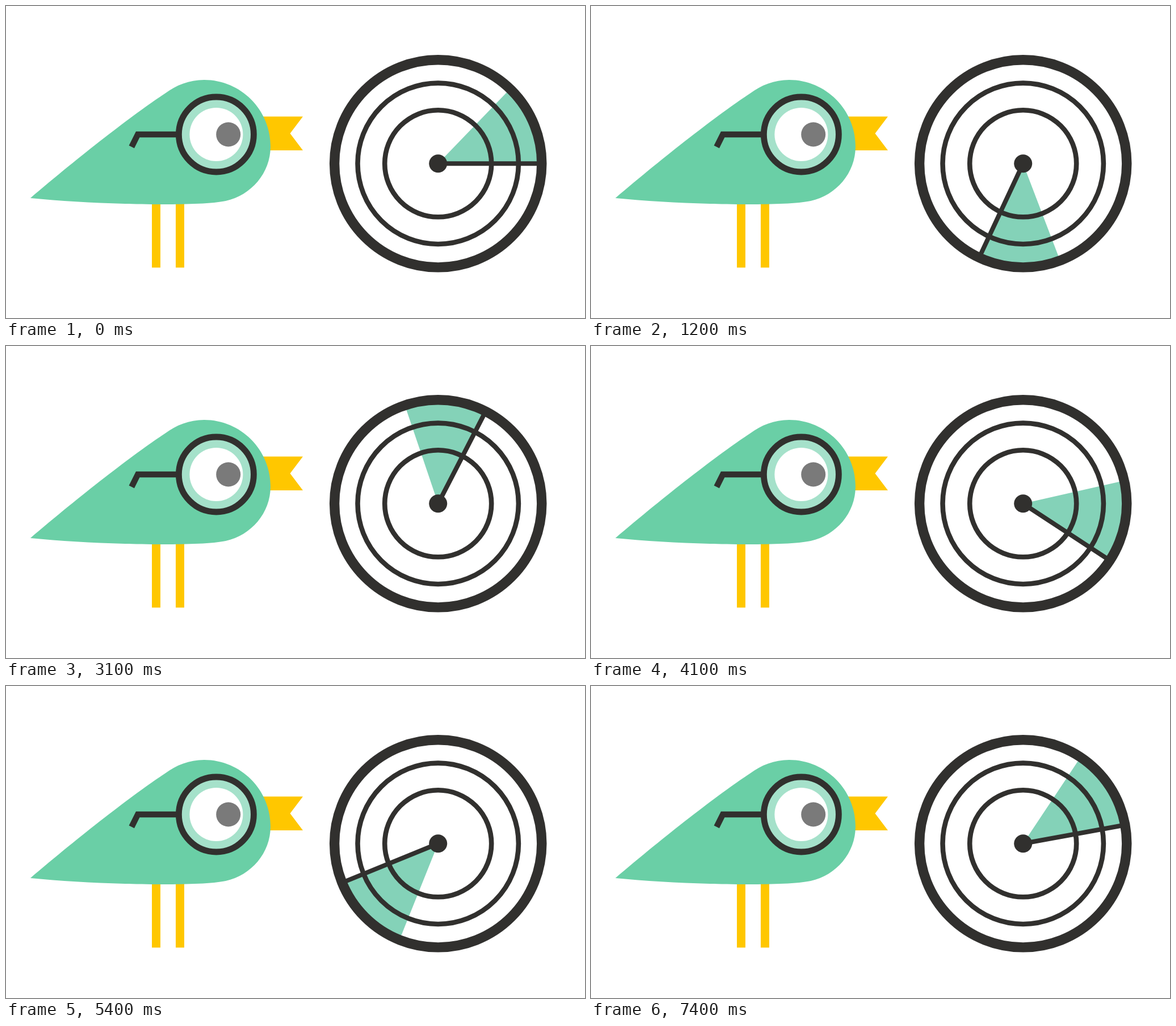
These frames come from a looping animation (1020x549 px, 7.5 s). An HTML page with a canvas:

```html
<!DOCTYPE html>
<html lang="en">
<head>
<meta charset="utf-8">
<title>Bird and radar</title>
<style>
  html, body { margin: 0; width: 100%; height: 100%; overflow: hidden; background: #fff; }
  canvas { display: block; }
</style>
</head>
<body>
<canvas id="stage" width="1020" height="549"></canvas>
<script>
const ctx = document.getElementById('stage').getContext('2d');
const DARK = '#31302e', GREEN = '#6acfa6', YELLOW = '#ffc700';
const SWEEP = '#84d2b8', LENS = '#a5e1ca', PUPIL = '#7a7a7a';

const LOOP = 7500, STEP = 100;
const SPEED = 0.0959; // degrees per ms
const SPREAD = 46;
const RADAR = { x: 761.2, y: 277.3 };
const rad = deg => deg * Math.PI / 180;

const body = new Path2D(
  'M43 338C130 264 225 190 280 154C300 139 323 130 349 130' +
  'C414 130 466 183 466 247C466 294 432 333 387 343' +
  'C350 351 245 349 210 348C150 346.5 95 343 43 338Z');
const beak = new Path2D('M440 194.5H523L500.5 224.2L523 254H440Z');
const temple = new Path2D('M304 226H232.2L221.3 247.8');

function fill(path, color) {
  ctx.fillStyle = color;
  ctx.fill(path);
}

function stroke(path, width) {
  ctx.strokeStyle = DARK;
  ctx.lineWidth = width;
  ctx.stroke(path);
}

function circle(x, y, r) {
  const path = new Path2D();
  path.arc(x, y, r, 0, Math.PI * 2);
  return path;
}

function drawBird() {
  ctx.fillStyle = YELLOW;
  for (const x of [257, 299]) ctx.fillRect(x, 335, 15, 125.3);
  fill(beak, YELLOW);
  fill(body, GREEN);
  stroke(temple, 10.5);
  const lens = circle(370.4, 226, 66);
  fill(lens, LENS);
  fill(circle(370.4, 226, 47), '#fff');
  fill(circle(391.7, 226, 21.5), PUPIL);
  stroke(lens, 10.8);
}

function drawRadar(angle) {
  const { x, y } = RADAR;
  const end = rad(angle);

  const wedge = new Path2D();
  wedge.moveTo(x, y);
  wedge.arc(x, y, 180, rad(angle - SPREAD), end);
  wedge.closePath();
  fill(wedge, SWEEP);

  const hand = new Path2D();
  hand.moveTo(x, y);
  hand.lineTo(x + 180 * Math.cos(end), y + 180 * Math.sin(end));
  stroke(hand, 8);

  stroke(circle(x, y, 182.6), 17.4);
  stroke(circle(x, y, 141.7), 8.6);
  stroke(circle(x, y, 94), 8.6);
  fill(circle(x, y, 16), DARK);
}

function draw(now) {
  const time = Math.floor((now % LOOP) / STEP) * STEP;
  ctx.fillStyle = '#fff';
  ctx.fillRect(0, 0, 1020, 549);
  drawBird();
  drawRadar(time * SPEED);
}

let start;
function tick(now) {
  start ??= now;
  draw(now - start);
  requestAnimationFrame(tick);
}
draw(0);
requestAnimationFrame(tick);
</script>
</body>
</html>
```
